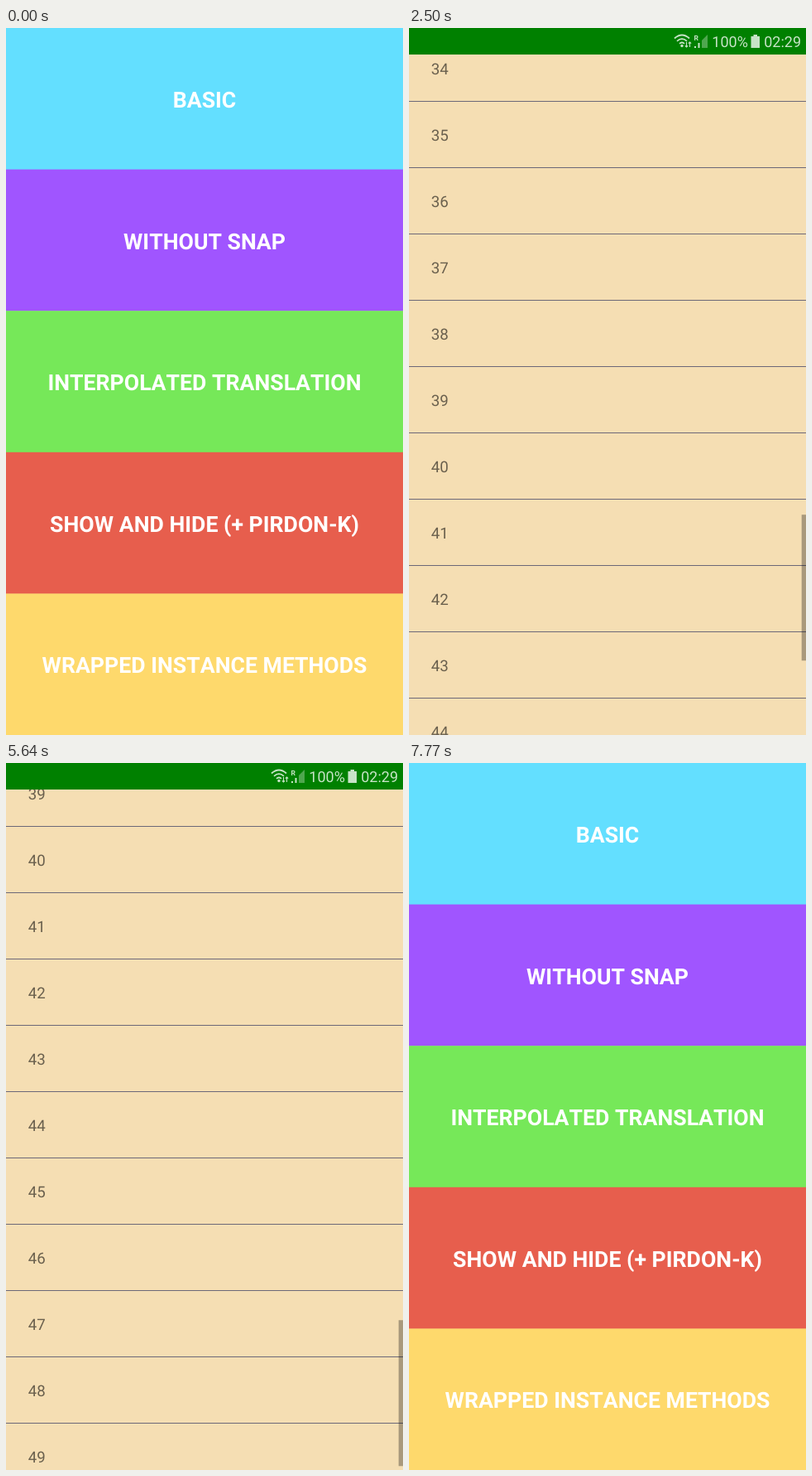
Write an HTML page that moves like this. It is 480 px wide and 853 px high and loops after 8 s.

```html
<!DOCTYPE html>
<html lang="en">
<head>
<meta charset="utf-8">
<title>Collapsing header</title>
<style>
  html, body { margin: 0; width: 100%; height: 100%; overflow: hidden; }
  svg {
    display: block; width: 100%; height: 100%;
    font-family: Roboto, sans-serif; font-kerning: none; text-rendering: geometricPrecision;
  }
  .bold { font-weight: 700; font-size: 26.67px; fill: #fff; }
  .row { font-size: 18.67px; fill: #000; fill-opacity: .57; }
  .status { font-size: 18px; fill: #fff; }
</style>
</head>
<body>
<svg id="stage" viewBox="0 0 480 853" preserveAspectRatio="none">
  <g id="home"></g>
  <g id="card">
    <rect width="480" height="853" fill="#f5deb3"/>
    <g id="list"></g>
    <rect id="thumb" x="474.7" width="5.3" fill="#000"/>
    <g id="header">
      <rect width="480" height="133" fill="#008000"/>
      <text class="bold" x="50" y="93.3">&lt;-</text>
      <text class="bold" x="124.6" y="93.3">BASIC</text>
    </g>
  </g>
  <g id="status" class="status">
    <g fill="none" stroke="#fff" stroke-width="1.7">
      <path d="M321 12.5Q330 4.5 339 12.5M324 15.8Q330 10.4 336 15.8M327 18.8Q330 16.2 333 18.8"/>
      <path d="M335.5 17v6m-1.7-1.7l1.7 1.7 1.7-1.7M339.5 23v-6m-1.7 1.7l1.7-1.7 1.7 1.7" stroke-width="1.1"/>
    </g>
    <circle cx="330" cy="21.5" r="1.7"/>
    <text x="344.6" y="15" font-weight="700" style="font-size:8.5px">R</text>
    <path d="M345 24v-2h2v2zM349.5 24v-6h2v6z"/>
    <path d="M354 24V15L361 8V24z" opacity=".4"/>
    <text x="366.3" y="23.2">100%</text>
    <path d="M416.5 8h4.5v2h3v14h-10.5v-14h3z"/>
    <text x="474" y="23.2" text-anchor="end">02:29</text>
  </g>
</svg>
<script>
const LOOP = 8000, TICK = 1000 / 15;
const VIEW = 853, HEADER = 133, COLLAPSE = 101, ROW = 80, ROWS = 50;
const $ = id => document.getElementById(id);
const clamp = (v, lo = 0, hi = 1) => Math.min(hi, Math.max(lo, v));
const ramp = (t, a, b) => clamp((t - a) / (b - a));
const easeOut = p => u => 1 - Math.pow(1 - u, p);
const smooth = u => u * u * (3 - 2 * u);

function add(parent, tag, attrs, text) {
  const el = document.createElementNS('http://www.w3.org/2000/svg', tag);
  for (const k in attrs) el.setAttribute(k, attrs[k]);
  if (text !== undefined) el.textContent = text;
  parent.appendChild(el);
}

const tiles = [
  ['BASIC', '#63dfff'],
  ['WITHOUT SNAP', '#a055ff'],
  ['INTERPOLATED TRANSLATION', '#76e859'],
  ['SHOW AND HIDE (+ PIRDON-K)', '#e75e4d'],
  ['WRAPPED INSTANCE METHODS', '#fed96c']
];
tiles.forEach(([label, fill], i) => {
  const y = i * VIEW / 5;
  add($('home'), 'rect', { y, width: 480, height: VIEW / 5 + .5, fill });
  add($('home'), 'text', { class: 'bold', x: 240, y: y + 96, 'text-anchor': 'middle' }, label);
});

for (let i = 0; i < ROWS; i++) {
  add($('list'), 'text', { class: 'row', x: 26.67, y: i * ROW + 48 }, i);
  add($('list'), 'rect', { y: (i + 1) * ROW, width: 480, height: 1, fill: '#6c6878' });
}

// Swipes: start, end, scroll from, scroll to, easing
const swipes = [
  [1766.67, 2720, 0, 3200, u => (158 + 3042 * easeOut(1.465)(u)) / 3200],
  [2990, 3620, 3200, 3017, smooth],
  [5200, 5790, 3017, 3280, easeOut(1.84)],
  [5930, 6720, 3280, 3146, smooth]
];

// Scroll offset, and how far the header has slid up
function scrollAt(t) {
  const s = swipes.filter(w => t >= w[0]).pop();
  if (!s) return { y: 0, hidden: 0 };
  const [t0, t1, from, to, ease] = s;
  const y = from + (to - from) * ease(ramp(t, t0, t1));
  const moved = Math.min(COLLAPSE, Math.abs(y - from));
  return { y, hidden: to > from ? moved : COLLAPSE - moved };
}

// Page position: 0 is away, 1 is fully in
function cardAt(t) {
  return t < 7000 ? easeOut(5)(ramp(t, 735, 1085)) : 1 - Math.pow(ramp(t, 7280, 7560), 4);
}

function cardOpacity(p) {
  if (p < .5) return p / 2;
  return p < .9 ? .25 + (p - .5) * 1.125 : .7 + (p - .9) * 3;
}

function thumbAlpha(t) {
  if (t < 1760) return 1 - ramp(t, 1320, 1560);
  return t < 5190 ? 1 - ramp(t, 3900, 4150) : 1 - ramp(t, 6790, 7060);
}

function draw(time) {
  const t = Math.floor((time - 33) / TICK) * TICK + 33.34;
  const { y, hidden } = scrollAt(t);
  const p = cardAt(t);
  const loaded = t < 1760 ? 10 : y < 900 ? 30 : ROWS;
  const content = HEADER + loaded * ROW;
  const shift = (el, dy) => el.setAttribute('transform', `translate(0 ${dy})`);

  shift($('card'), (1 - p) * 66.67);
  $('card').setAttribute('opacity', cardOpacity(p));
  $('card').setAttribute('visibility', p > 0 ? 'visible' : 'hidden');
  shift($('list'), HEADER - Math.round(y));
  shift($('header'), -Math.round(hidden));
  $('thumb').setAttribute('y', y / content * VIEW);
  $('thumb').setAttribute('height', VIEW * VIEW / content);
  $('thumb').setAttribute('opacity', .31 * thumbAlpha(t));
  $('status').setAttribute('opacity', t < 7760 ? .78 * ramp(t, 1320, 1560) : 0);
}

function frame() {
  draw(performance.now() % LOOP);
  requestAnimationFrame(frame);
}
frame();
</script>
</body>
</html>
```
